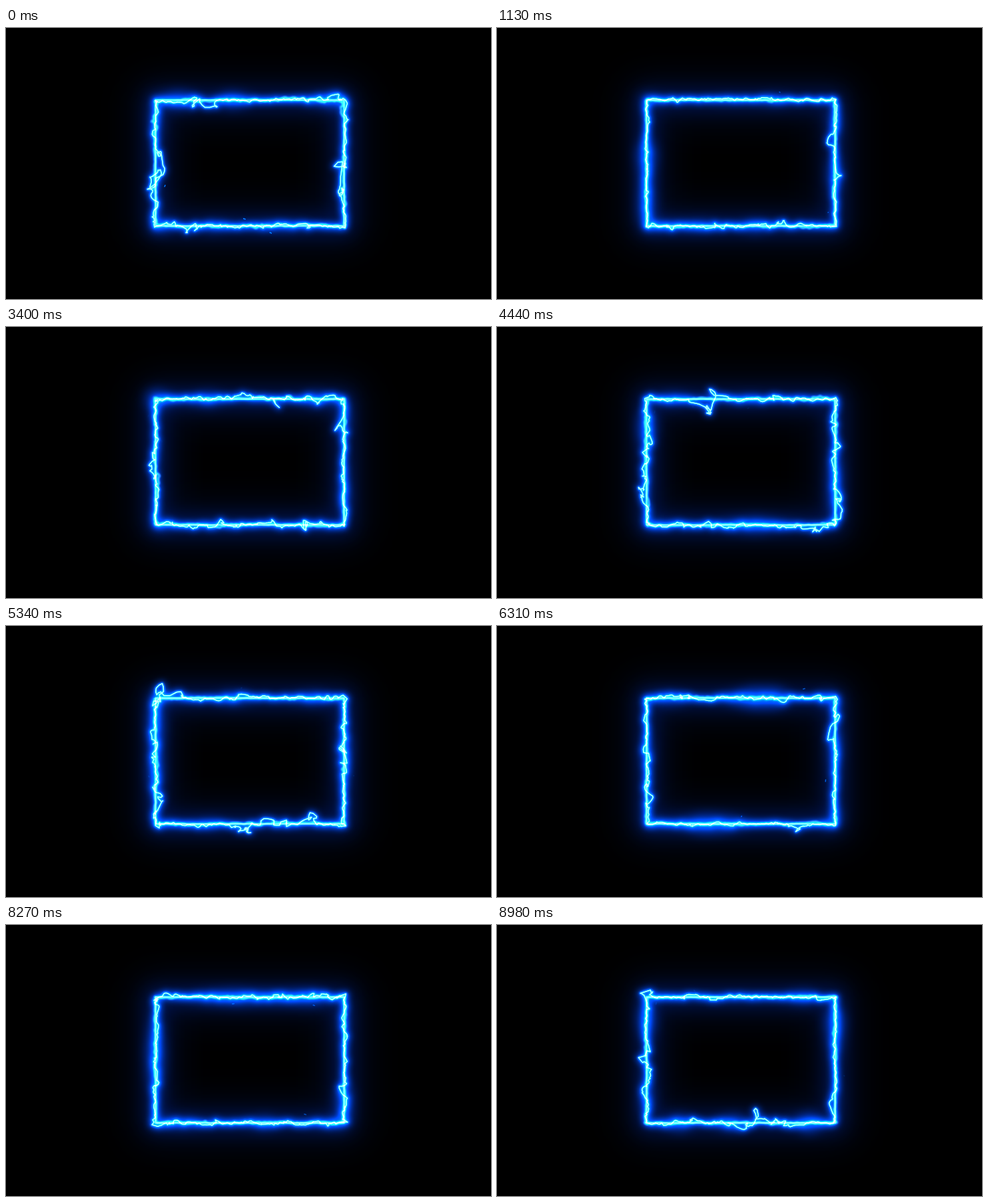
An HTML page with a canvas for the animation above (9020 ms loop, 728 px wide and 408 px high).

```html
<!DOCTYPE html>
<html lang="en">
<head>
<meta charset="utf-8">
<title>Electric frame</title>
<style>
html, body { margin: 0; width: 100%; height: 100%; overflow: hidden; background: #000; }
canvas { display: block; }
</style>
</head>
<body>
<canvas id="stage" width="728" height="408"></canvas>
<script>
const LOOP = 9020, STEPS = 270;
const X = 224.5, Y = 108.5, W = 283, H = 189.5, AROUND = 2 * (W + H);
const stage = document.getElementById('stage');
const ctx = stage.getContext('2d');

function hash(a, b, c) {
  let h = Math.imul(a, 374761393) ^ Math.imul(b, 668265263) ^ Math.imul(c, 1274126177);
  h = Math.imul(h ^ (h >>> 15), 2246822519);
  h = Math.imul(h ^ (h >>> 13), 3266489917);
  return ((h ^ (h >>> 16)) >>> 0) / 4294967296;
}

const mix = (a, b, k) => a + (b - a) * k;
const ease = k => k * k * (3 - 2 * k);

// Noise in 0..1, periodic around the frame: jagged along it, smooth in time
function noise(s, cells, t, seed) {
  const u = s / AROUND * cells, i = Math.floor(u), j = Math.floor(t);
  const at = (a, b) => hash((a + cells) % cells, b, seed);
  const row = b => mix(at(i, b), at(i + 1, b), u - i);
  return mix(row(j), row(j + 1), ease(t - j));
}

const rough = (s, t, seed) =>
  (noise(s, 60, t / 200, seed) - .5) * 1.2 +
  (noise(s, 150, t / 120, seed + 1) - .5) * .9 +
  (noise(s, 320, t / 70, seed + 2) - .5) * .6;

// Point on the frame, pushed outward and along its side
function place(s, out, along) {
  s = (s + AROUND) % AROUND;
  if (s < W) return [X + s + along, Y - out];
  s -= W;
  if (s < H) return [X + W + out, Y + s + along];
  s -= H;
  if (s < W) return [X + W - s - along, Y + H + out];
  return [X - out, Y + H - (s - W) - along];
}

// A strand that hugs the frame and bursts out where the noise peaks
function bolt(t, calm, wild, seed) {
  const path = new Path2D();
  for (let s = 0; s < AROUND; s += 1.5) {
    const reach = calm + wild * noise(s, 36, t / 240, seed + 20) ** 5;
    path.lineTo(...place(s, rough(s, t, seed) * reach, rough(s, t, seed + 10) * reach));
  }
  path.closePath();
  return path;
}

// Patches where the glow swells
function patches(t) {
  const path = new Path2D();
  for (let s = 0; s < AROUND; s += 16) {
    const [x, y] = place(s, 0, 0), r = 16 * noise(s, 24, t / 300, 61) ** 2;
    path.moveTo(x + r, y);
    path.arc(x, y, r, 0, 7);
  }
  return path;
}

function sparks(t) {
  const path = new Path2D(), slot = Math.floor(t / 130);
  for (let k = 0; k < 3; k++) {
    const r = n => hash(slot, k, 50 + n);
    const out = (r(1) < .5 ? -1 : 1) * (9 + 6 * r(2)), s = r(0) * AROUND;
    path.moveTo(...place(s, out, 0));
    path.lineTo(...place(s, out + 2 * r(3) - 1, 3 * r(4)));
  }
  glow(ctx, path, 0, 1.5, `rgba(0,110,230,${1 - t / 130 + slot})`);
}

function glow(c, path, blur, width, color) {
  c.filter = blur ? `blur(${blur}px)` : 'none';
  c.lineWidth = width;
  c.strokeStyle = color;
  c.stroke(path);
}

function light(c) {
  c.globalCompositeOperation = 'lighter';
  c.lineJoin = 'round';
  c.lineCap = 'round';
}

// Steady frame and its halo
const base = document.createElement('canvas');
base.width = stage.width;
base.height = stage.height;
const still = base.getContext('2d');
const box = new Path2D();
box.rect(X, Y, W, H);
light(still);
glow(still, box, 24, 70, 'rgb(0,7,28)');
glow(still, box, 12, 34, 'rgb(0,12,48)');
glow(still, box, 5, 10, 'rgb(0,42,130)');
glow(still, box, 1.8, 4, 'rgb(0,95,220)');
glow(still, box, 0, 2, 'rgb(120,200,240)');

function draw(t) {
  ctx.globalCompositeOperation = 'copy';
  ctx.filter = 'none';
  ctx.drawImage(base, 0, 0);
  light(ctx);
  ctx.filter = 'blur(9px)';
  ctx.fillStyle = 'rgb(0,45,150)';
  ctx.fill(patches(t));
  const tight = bolt(t, 3, 6, 1), loose = bolt(t, 5.5, 42, 101);
  glow(ctx, loose, 5, 9, 'rgb(0,48,150)');
  glow(ctx, loose, 1.5, 3.5, 'rgb(0,110,235)');
  glow(ctx, tight, 1, 2.4, 'rgb(70,160,240)');
  glow(ctx, loose, 0, 1.5, 'rgb(190,235,250)');
  sparks(t);
}

let shown = -1;
const start = performance.now();
function tick() {
  const step = Math.floor((performance.now() - start) % LOOP / LOOP * STEPS);
  if (step !== shown) {
    shown = step;
    draw(step * LOOP / STEPS);
  }
  requestAnimationFrame(tick);
}
tick();
</script>
</body>
</html>
```
